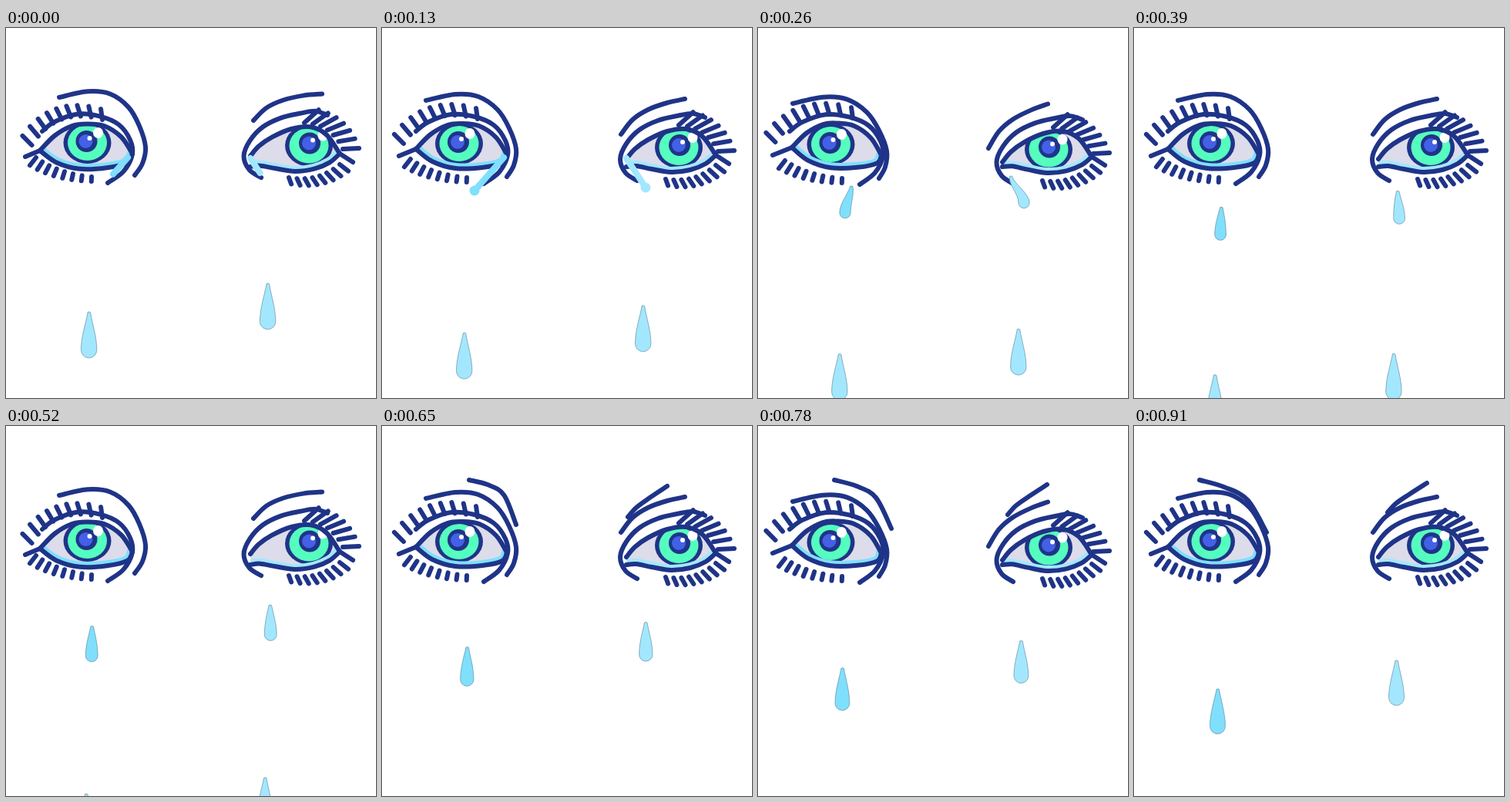
An HTML page with a canvas for the animation above (1.04 s loop, 480 px wide and 480 px high).

```html
<!DOCTYPE html>
<html lang="en">
<head>
<meta charset="utf-8">
<title>Crying eyes</title>
<style>
html, body { margin: 0; width: 100%; height: 100%; overflow: hidden; background: #fff; }
canvas { display: block; }
</style>
</head>
<body>
<canvas id="stage" width="480" height="480"></canvas>
<script>
const ctx = document.getElementById('stage').getContext('2d');
const STEP = 130, STEPS = 8;
const NAVY = '#1f3488', MINT = '#55fdbe', BLUE = '#4460e6', SCLERA = '#dcdcea';
const WATER = '#80dffc', TEAR = '#a3e7ff', RIM = '#527f91';

// A line is [key points, drift of its first point, drift of its last point];
// drift is how far the point travels as the gaze goes from 0 to 1.
const left = {
  brow: ['57 94 95 86 125 89 150 106 165 130 174 157 171 178 162 193', [-12, 4], [-5, 2]],
  crease: ['44 134 60 122 90 112 120 115 145 126 160 146 163 165 152 187 132 202', [-3, 0], [0, 1]],
  lid: ['44 157 63 138 85 126 103 124 126 127 148 142 162 164', [0, -2], [-2, 1]],
  lower: ['44 157 65 173 95 182 130 181 156 175 162 164', [0, -2], [-2, 1]],
  tail: ['22 166 44 157', [-3, -1], [0, -2]],
  extra: ['99 70 128 78 153 93 173 133', [-14, 0], [-1, 5]],
  iris: [100, 150], irisDrift: [-5.5, 1], pupil: [-1, -2], shine: [14, -13],
  lashes: [
    { count: 9, arc: [28, 150, 62, 100, 124, 118], angle: [-135, -98], size: [17, 14], drift: [[-5.5, -2], [-1, -1]] },
    { count: 8, arc: [37, 170, 65, 190, 110, 194], angle: [128, 92], size: [13, 6], drift: [[-2, 2], [-1, 1]] }
  ],
  water: WATER, corner: [158, 168], tip: [120, 211],
  drop: { x: 113, y: 232, speed: 27.2, gravity: 0, lean: 8 }
};
const right = {
  brow: ['310 138 325 119 345 106 370 97 393 92', [-11, 18], [-17, 6.5]],
  crease: ['419 116 403 111 383 114 358 120 334 132 317 150 309 170 316 188 331 198', [2, 3], [0, 4]],
  lid: ['317 170 328 157 345 145 370 134 395 131 416 141 433 165', [0, 4], [0, 2]],
  lower: ['317 180 330 179 350 183 375 187 400 184 420 176 433 165', [0, 0], [0, 2]],
  tail: ['433 165 450 176', [0, 2], [0, 2]],
  extra: ['324 115 335 103 352 91 375 76', [5, -3], [5, -2]],
  iris: [385, 155], irisDrift: [-8, 2.5], pupil: [1, -3], shine: [18, -13],
  lashes: [
    { count: 7, arc: [385, 126, 420, 128, 436, 160], angle: [-42, -3], size: [25, 21], drift: [[-2, 3], [-1, 3]] },
    { count: 8, arc: [368, 196, 405, 202, 433, 178], angle: [70, 38], size: [9, 14], drift: [[1, 2], [0, 1]] }
  ],
  water: TEAR, corner: [317, 169], tip: [342, 207],
  drop: { x: 345, y: 211, speed: 20, gravity: 0.8, lean: -17 }
};

const mix = (a, b, t) => a + (b - a) * t;
const smooth = t => t * t * (3 - 2 * t);

function points([text, first, last], shift) {
  const n = text.split(' ').map(Number), list = [];
  for (let i = 0; i < n.length; i += 2) {
    const t = i / (n.length - 2);
    list.push([n[i] + shift * mix(first[0], last[0], t), n[i + 1] + shift * mix(first[1], last[1], t)]);
  }
  return list;
}

// Smooth curve through all points.
function curve(p) {
  const path = new Path2D();
  path.moveTo(...p[0]);
  for (let i = 0; i < p.length - 1; i++) {
    const a = p[i - 1] || p[i], b = p[i], c = p[i + 1], d = p[i + 2] || c;
    path.bezierCurveTo(b[0] + (c[0] - a[0]) / 6, b[1] + (c[1] - a[1]) / 6,
      c[0] - (d[0] - b[0]) / 6, c[1] - (d[1] - b[1]) / 6, c[0], c[1]);
  }
  return path;
}

function stroke(path, width = 6, color = NAVY) {
  ctx.lineWidth = width;
  ctx.strokeStyle = color;
  ctx.stroke(path);
}

function oval(x, y, rx, ry, color) {
  ctx.fillStyle = color;
  ctx.beginPath();
  ctx.ellipse(x, y, rx, ry, 0, 0, Math.PI * 2);
  ctx.fill();
}

// Hairs spaced along a quadratic arc, fanning from one angle to another.
function fan({ count, arc, angle, size, drift }, gaze) {
  const path = new Path2D();
  for (let i = 0; i < count; i++) {
    const t = i / (count - 1);
    const at = k => mix(mix(arc[k], arc[k + 2], t), mix(arc[k + 2], arc[k + 4], t), t)
      + gaze * mix(drift[0][k], drift[1][k], t);
    const x = at(0), y = at(1), a = mix(...angle, t) * Math.PI / 180, r = mix(...size, t);
    path.moveTo(x, y);
    path.lineTo(x + r * Math.cos(a), y + r * Math.sin(a));
  }
  stroke(path);
}

function drawEye(eye, gaze) {
  const line = name => curve(points(eye[name], gaze));
  const opening = curve(points(eye.lid, gaze).concat(points(eye.lower, gaze).reverse()));
  const x = eye.iris[0] + gaze * eye.irisDrift[0], y = eye.iris[1] + gaze * eye.irisDrift[1];
  const px = x + eye.pupil[0], py = y + eye.pupil[1];

  ctx.save();
  ctx.clip(opening);
  ctx.fillStyle = SCLERA;
  ctx.fill(opening);
  oval(x, y, 31, 27, NAVY);
  oval(x, y, 25.5, 23, MINT);
  oval(px, py, 14, 14, NAVY);
  oval(px - 1, py, 9, 9, BLUE);
  stroke(line('lower'), 14, eye.water);
  ctx.restore();
  oval(x + eye.shine[0], y + eye.shine[1], 6.5, 7, '#fff');
  oval(px + 4, py - 4, 3, 3, '#fff');
  for (const name of ['brow', 'crease', 'lid', 'lower', 'tail']) stroke(line(name));
  eye.lashes.forEach(row => fan(row, gaze));
}

// A tear seeping from the inner corner; its bulb swells as it grows.
function drawSeep({ corner, tip, water }, grown) {
  const x = mix(corner[0], tip[0], grown), y = mix(corner[1], tip[1], grown);
  stroke(curve([corner, [x, y]]), 8, water);
  oval(x, y, 6.5 * grown, 6.5 * grown, water);
}

function drawDrop({ x: x0, y: y0, speed, gravity, lean }, age, color) {
  const k = age - 3;
  const top = y0 + speed * k + gravity * k * k;
  const x = x0 - 0.9 * (age - 2), tipX = x + lean / (age - 1) ** 3;
  const size = 42 + 18 * smooth(Math.min(1, (age - 2) / 6));
  const r = size * 0.17, y = top + size - r, h = y - top;
  const path = new Path2D();
  path.moveTo(tipX - 1.5, top + 1);
  path.quadraticCurveTo(tipX, top - 1, tipX + 2, top + 1);
  path.bezierCurveTo(tipX + 4, top + h * 0.3, x + r, y - h * 0.35, x + r, y);
  path.arc(x, y, r, 0, Math.PI);
  path.bezierCurveTo(x - r, y - h * 0.35, tipX - 4, top + h * 0.3, tipX - 1.5, top + 1);
  ctx.fillStyle = color;
  ctx.fill(path);
  stroke(path, 0.6, RIM);
}

function draw(step) {
  const gaze = Math.round(-Math.cos(step * Math.PI / 2));
  ctx.fillStyle = '#fff';
  ctx.fillRect(0, 0, 480, 480);
  ctx.lineCap = ctx.lineJoin = 'round';

  for (const eye of [left, right]) {
    drawEye(eye, gaze);
    if (step > 4) stroke(curve(points(eye.extra, step - 6)));
    if (step < 2) drawSeep(eye, (step + 1) / 2);
    else drawDrop(eye.drop, step, eye.water);
    drawDrop(eye.drop, step + STEPS, TEAR);
  }
}

const start = performance.now();
function tick() {
  draw(Math.floor((performance.now() - start) / STEP) % STEPS);
  requestAnimationFrame(tick);
}
tick();
</script>
</body>
</html>
```
